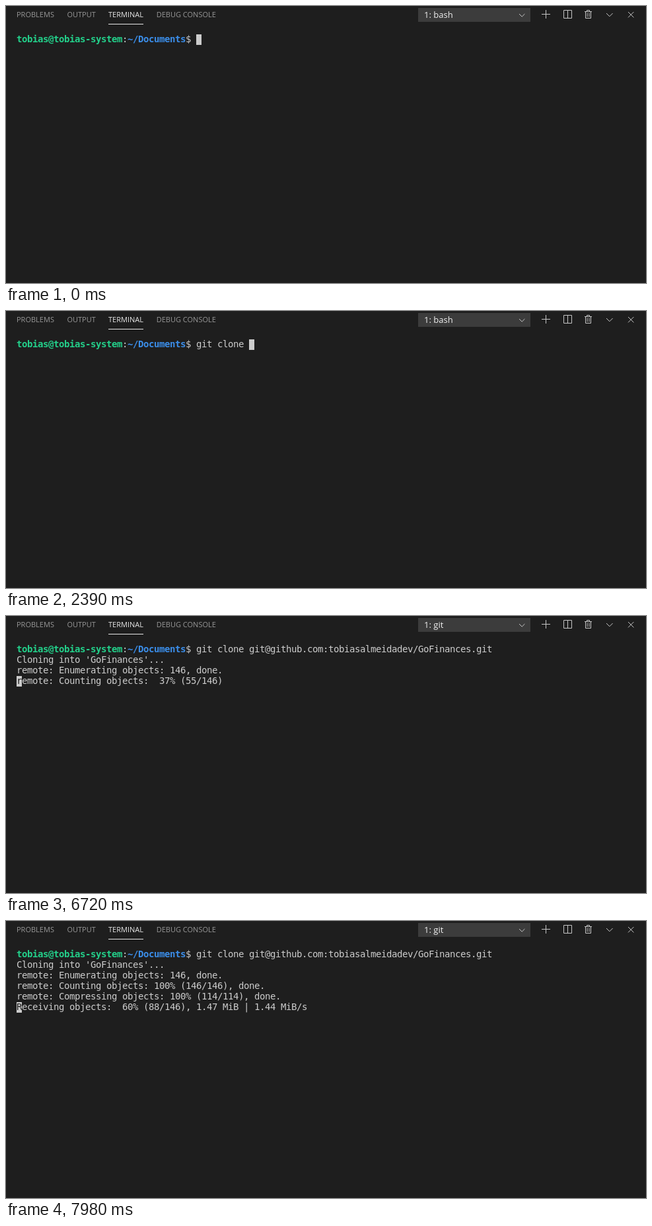
An HTML page that plays this animation: 969 px wide and 420 px high, repeating every 8000 ms.

```html
<!DOCTYPE html>
<html lang="en">
<head>
<meta charset="utf-8">
<title>Terminal: git clone</title>
<style>
  html, body { margin: 0; width: 100%; height: 100%; overflow: hidden; background: #1e1e1e; }
  svg { position: absolute; left: 0; top: 0; }
  svg text { font: 11px "Open Sans", "Noto Sans", sans-serif; fill: #979797; }
  svg .active { fill: #e7e7e7; }
  svg #shell { font-size: 13px; fill: #f0f0f0; }
  svg path { fill: none; stroke: #c5c5c5; }
  #term, #cursor {
    position: absolute; margin: 0; white-space: pre;
    font: 14px/16px "DejaVu Sans Mono", monospace;
    font-variant-ligatures: none;
    letter-spacing: calc(8px - 1ch);
    color: #ccc;
  }
  #term { left: 16px; top: 42px; }
  #term b { font-weight: bold; }
  .user { color: #23d18b; }
  .dir { color: #3b8eea; }
  #cursor { width: 8px; height: 16px; line-height: 14px; background: #ccc; color: #1e1e1e; overflow: hidden; }
</style>
</head>
<body>
<svg width="969" height="420" viewBox="0 0 969 420">
  <text x="16" y="17">PROBLEMS</text>
  <text x="92.4" y="17">OUTPUT</text>
  <text x="155" y="17" class="active">TERMINAL</text>
  <text x="227.7" y="17">DEBUG CONSOLE</text>
  <rect x="155" y="27" width="53" height="1" fill="#e7e7e7"/>
  <rect x="624" y="3" width="170" height="21" fill="#3c3c3c"/>
  <text id="shell" x="633" y="18">1: bash</text>
  <path d="M777 12l4.2 4.2l4.2-4.2"/>
  <path d="M811 12.5h13M817.5 6v13"/>
  <path d="M844.5 6.5h12v12h-12zM850.5 6.5v12"/>
  <path d="M876 8.5h11M879.5 8.5v-2h4v2M877.5 8.5v10h8v-10M880 10.5v6M883 10.5v6"/>
  <path d="M909 11l4.8 4.8l4.8-4.8"/>
  <path d="M942 9l8.4 8.4M950.4 9l-8.4 8.4"/>
</svg>
<pre id="term"><b class="user">tobias@tobias-system</b>:<b class="dir">~/Documents</b>$ <span id="cmd"></span>
<span id="out"></span></pre>
<pre id="cursor"></pre>
<script>
const LOOP = 8000;
const PROMPT_COLS = 34;
const COMMAND = 'git clone git@github.com:tobiasalmeidadev/GoFinances.git';
const OBJECTS = 146, DELTAS = 114;
const $ = id => document.getElementById(id);

const progress = (label, n, total) =>
  `${label} objects: ${String(Math.floor(n * 100 / total)).padStart(3)}% (${n}/${total})`;
const counting = n => progress('remote: Counting', n, OBJECTS);
const packing = n => progress('remote: Compressing', n, DELTAS);
const receiving = (n, rate = '') => progress('Receiving', n, OBJECTS) + rate;

const started = ["Cloning into 'GoFinances'..."];
const listed = [...started, `remote: Enumerating objects: ${OBJECTS}, done.`];
const counted = [...listed, counting(OBJECTS) + ', done.'];
const packed = [...counted, packing(DELTAS) + ', done.'];
const slow = ', 668.00 KiB | 1.28 MiB/s', fast = ', 1.47 MiB | 1.44 MiB/s';

// Each step: start time, typed characters, output lines
const steps = [];
const type = (time, chars) => steps.push({ time, chars, lines: [] });
const print = (time, lines) => steps.push({ time, chars: COMMAND.length, lines });

[0, 500, 640, 710, 920, 1340, 1550, 1760, 2180, 2250, 2390].forEach(type);
type(3720, COMMAND.length);
print(4720, [...started, '']);
print(6720, [...listed, counting(55)]);
print(6790, [...listed, counting(114)]);
[2, 28, 52, 78, 104].forEach((n, i) => print(6860 + i * 70, [...counted, packing(n)]));
print(7210, [...packed, receiving(3)]);
print(7280, [...packed, receiving(30)]);
[31, 38, 45, 53, 61, 70, 79].forEach((n, i) =>
  print(7490 + i * 70, [...packed, receiving(n, slow)]));
print(7980, [...packed, receiving(88, fast)]);

function show({ chars, lines }) {
  const row = lines.length;
  const col = row ? 0 : PROMPT_COLS + chars;
  $('cmd').textContent = COMMAND.slice(0, chars);
  $('out').textContent = lines.join('\n');
  $('shell').textContent = row ? '1: git' : '1: bash';
  $('cursor').textContent = row ? lines[row - 1].charAt(0) : '';
  $('cursor').style.left = 16 + col * 8 + 'px';
  $('cursor').style.top = 43 + row * 16 + 'px';
}

const start = performance.now();
let current;
function tick() {
  const time = (performance.now() - start) % LOOP;
  const step = steps.filter(s => s.time <= time).pop();
  if (step !== current) show(current = step);
  requestAnimationFrame(tick);
}
tick();
</script>
</body>
</html>
```
